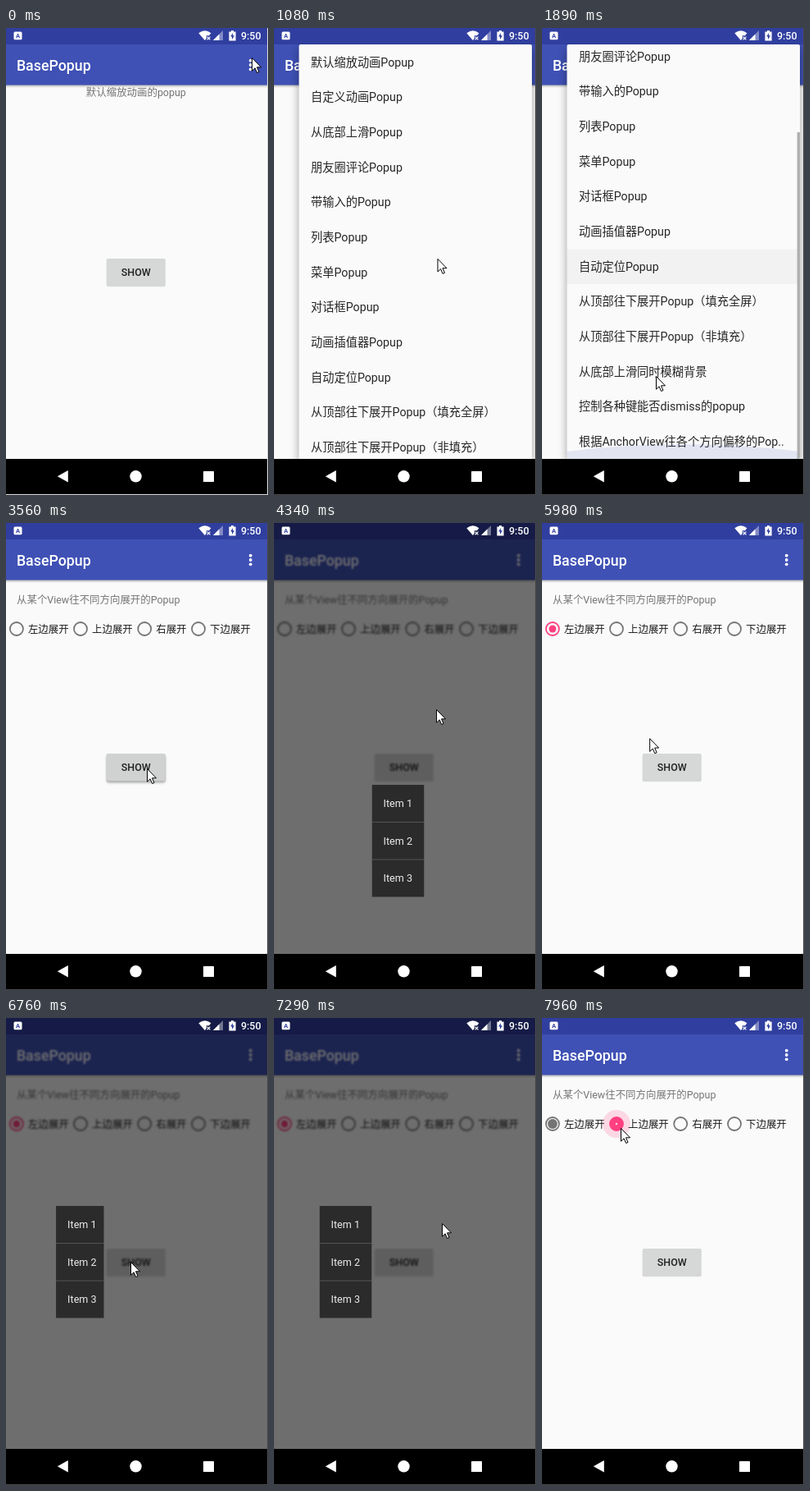
These frames come from a looping animation (320 px wide and 569 px high, 7.99 s). An HTML page:

```html
<!DOCTYPE html>
<html lang="zh-CN">
<head>
<meta charset="utf-8">
<title>BasePopup</title>
<style>
html, body { margin: 0; width: 100%; height: 100%; overflow: hidden; background: #000; }
svg { display: block; width: 100vw; height: 100vh; font-family: Roboto, "Noto Sans CJK SC", "Noto Sans CJK", "Noto Sans", sans-serif; }
text { white-space: pre; }
.body { font-size: 12.44px; }
.row { font-size: 14.22px; fill: #262626; }
.item { font-size: 12.6px; fill: #ececec; }
.medium { font-weight: 500; }
</style>
</head>
<body>
<svg viewBox="0 0 320 569" preserveAspectRatio="none">
  <defs>
    <clipPath id="screen"><rect y="19" width="319" height="506"/></clipPath>
    <clipPath id="list"><rect x="30.5" y="20" width="284.5" height="505" rx="2"/></clipPath>
    <clipPath id="reveal"><rect id="revealBox"/></clipPath>
    <clipPath id="below"><rect x="119.5" y="319" width="64" height="137"/></clipPath>
    <clipPath id="left"><rect x="55.5" y="229" width="64" height="137"/></clipPath>
    <linearGradient id="fall" x2="0" y2="1">
      <stop offset="0" stop-color="#000" stop-opacity=".3"/>
      <stop offset="1" stop-color="#000" stop-opacity="0"/>
    </linearGradient>
    <filter id="soft" x="-20%" y="-20%" width="140%" height="150%"><feGaussianBlur stdDeviation="1.6"/></filter>
    <filter id="wide" x="-10%" y="-10%" width="120%" height="120%"><feGaussianBlur stdDeviation="6"/></filter>
  </defs>

  <rect width="320" height="569" fill="#fafafa"/>
  <rect y="69" width="320" height="4" fill="url(#fall)"/>
  <rect width="320" height="20" fill="#303f9f"/>
  <rect y="20" width="320" height="49.5" fill="#3f51b5"/>

  <g id="content">
    <text class="medium" x="12.9" y="52" font-size="17.78" fill="#fff">BasePopup</text>
    <g fill="#fff">
      <circle cx="298.7" cy="39.7" r="1.9"/><circle cx="298.7" cy="45" r="1.9"/><circle cx="298.7" cy="50.3" r="1.9"/>
    </g>
    <text id="first" class="body" x="158.8" y="83" text-anchor="middle" fill="#757575">默认缩放动画的popup</text>
    <g id="second">
      <text class="body" x="13" y="97.5" fill="#757575">从某个View往不同方向展开的Popup</text>
      <g id="radios"></g>
    </g>
    <rect id="lift" x="123" y="283" width="71.5" height="33.5" rx="2" fill="#000" filter="url(#soft)"/>
    <rect x="122.6" y="281.2" width="72.2" height="34" rx="2" fill="#000" opacity=".12"/>
    <rect id="button" x="123" y="281" width="71.5" height="33.4" rx="1.8"/>
    <text class="medium body" x="158.8" y="302.4" text-anchor="middle" fill="#1f1f1f">SHOW</text>
  </g>

  <rect id="dim" width="319" height="525" fill="#000"/>
  <g clip-path="url(#below)"><g id="popBelow"></g></g>
  <g clip-path="url(#left)"><g id="popLeft"></g></g>

  <g clip-path="url(#screen)">
    <g id="menu" clip-path="url(#reveal)">
      <rect x="30.5" y="25" width="284.5" height="505" fill="#000" opacity=".36" filter="url(#wide)"/>
      <rect x="30.5" y="20" width="284.5" height="510" rx="2" fill="#fafafa"/>
      <g clip-path="url(#list)">
        <g id="rows">
          <rect id="hover" x="30" width="286" height="42.67"/>
          <rect id="press" x="30" width="286" height="42.67"/>
        </g>
        <path id="glow" d="M30 516Q172 498 315 516V525H30Z" fill="#3f51b5"/>
        <rect id="thumb" x="311.6" width="3.4" height="398" fill="#b0b0b0"/>
      </g>
    </g>
  </g>

  <g fill="#fff">
    <rect x="9.5" y="4.5" width="10" height="9.8" rx="1.5"/>
    <text x="14.5" y="12.2" font-size="7.5" font-weight="700" text-anchor="middle" fill="#303f9f">A</text>
    <path d="M235.3 6.2Q243 .2 250.4 6.2L248 9.2H244.7V13L242.8 15Z"/>
    <path d="M245.6 10.6l3.8 3.8m0-3.8l-3.8 3.8" stroke="#fff" stroke-width="1.2"/>
    <path d="M253 15L265 3V15Z" opacity=".4"/>
    <path d="M253 15L260.5 7.5V15Z"/>
    <path d="M275 3h3v1.4h2.6V15.6h-8.2V4.4H275Z"/>
    <path d="M277 6L274.2 10.6H276V14L279 9.2H277Z" fill="#303f9f"/>
    <text class="medium body" x="287" y="14">9:50</text>
  </g>

  <rect y="525" width="320" height="44" fill="#000"/>
  <g fill="#fff">
    <path d="M62.8 546.3L75.8 539V553.6Z"/>
    <circle cx="158.5" cy="546.3" r="7.2"/>
    <rect x="241" y="540" width="13" height="13" rx=".6"/>
  </g>
  <path id="edge" d="M319 0H320V569H0V568H319Z"/>

  <path id="cursor" d="M.5.5V16.2L4.1 12.8 6.6 18.5 9 17.5 6.5 11.8H11.5Z" fill="#fff" stroke="#000" stroke-width="1"/>
</svg>
<script>
const LOOP = 7990, HOLD = 7960, ROW = 42.67, TOP = 20.4, SCROLL = 135;
const $ = id => document.getElementById(id);
const set = (el, attrs) => { for (const k in attrs) el.setAttribute(k, attrs[k]); return el; };
const add = (parent, tag, attrs, text = '') => {
  const el = set(document.createElementNS('http://www.w3.org/2000/svg', tag), attrs);
  el.textContent = text;
  return parent.appendChild(el);
};
const clamp = x => Math.min(1, Math.max(0, x));
const part = (t, from, to) => clamp((t - from) / (to - from));
const smooth = p => p * p * (3 - 2 * p);
const out = (p, n) => 1 - (1 - p) ** n;
// rises over a..b, falls over c..d
const pulse = (t, a, b, c, d) => part(t, a, b) * (1 - part(t, c, d));

const names = [
  '默认缩放动画Popup', '自定义动画Popup', '从底部上滑Popup', '朋友圈评论Popup', '带输入的Popup',
  '列表Popup', '菜单Popup', '对话框Popup', '动画插值器Popup', '自动定位Popup',
  '从顶部往下展开Popup（填充全屏）', '从顶部往下展开Popup（非填充）', '从底部上滑同时模糊背景',
  '控制各种键能否dismiss的popup', '根据AnchorView往各个方向偏移的Pop..'
];
names.forEach((name, i) => add($('rows'), 'text', { class: 'row', x: 45, y: TOP + ROW * (i + .5) + 5 }, name));
set($('hover'), { y: TOP + ROW * 9 });
set($('press'), { y: TOP + ROW * 14 });

const R = 8.9, THIN = 1.78, DOT = 4.44;
const radios = [[12.9, '左边展开'], [91, '上边展开'], [169.2, '右展开'], [235, '下边展开']].map(([cx, label]) => {
  const g = $('radios'), at = { cx, cy: 129 };
  const ripple = add(g, 'circle', { ...at, fill: '#ff4081' });
  const ring = add(g, 'circle', { ...at, fill: 'none' });
  const dot = add(g, 'circle', at);
  add(g, 'text', { class: 'body', x: cx + 14, y: 133.6, fill: '#1c1c1c' }, label);
  return { ripple, ring, dot };
});

// p = 0 is empty, 1 is checked; the disc is full halfway
function drawRadio({ ripple, ring, dot }, p, color, wave = 0, alpha = 0) {
  const w = p < .5 ? THIN + (R - THIN) * 2 * p : THIN;
  set(ring, { r: R - w / 2, 'stroke-width': w, stroke: color });
  set(dot, { r: p < .5 ? 0 : R - (R - DOT) * (2 * p - 1), fill: color });
  set(ripple, { r: 17 * wave, opacity: .18 * alpha });
}

function buildPopup(g, x, y) {
  add(g, 'rect', { x, y, width: 64, height: 136.5, fill: '#2b2b2b' });
  for (let i = 0; i < 3; i++) {
    if (i) add(g, 'rect', { x, y: y + 45.5 * i - .4, width: 64, height: .9, fill: '#5a5a5a' });
    add(g, 'text', { class: 'item', x: x + 14, y: y + 45.5 * i + 27.3 }, 'Item ' + (i + 1));
  }
}
buildPopup($('popBelow'), 119.5, 319);
buildPopup($('popLeft'), 55.5, 229);

// time, x, y, eased on arrival
const path = [
  [0, 300, 36], [120, 300, 36], [280, 300, 43], [760, 300, 43], [1310, 139, 424, 1], [1950, 139, 424],
  [2250, 108, 500, 1], [2700, 108, 500], [3170, 182, 329, 1], [3200, 182, 329], [3330, 172, 299],
  [4140, 172, 299], [4340, 198, 227], [4400, 200, 224], [4560, 200, 224], [4930, 0, 118, 1],
  [5140, 0, 118], [5170, 4, 118], [5680, 4, 118], [5980, 131, 262], [6090, 149, 286], [6120, 149, 286],
  [6280, 152, 297], [7140, 152, 297], [7290, 205, 250], [7440, 205, 250], [7910, 96, 134, 1], [LOOP, 96, 134]
];
function cursorAt(t) {
  const i = path.findIndex(k => k[0] > t), a = path[i - 1], b = path[i];
  let p = part(t, a[0], b[0]);
  if (b[3]) p = smooth(p);
  return [a[1] + (b[1] - a[1]) * p, a[2] + (b[2] - a[2]) * p];
}

function draw(now) {
  const t = Math.min(now, HOLD);

  // overflow menu
  const open = out(part(t, 660, 900), 2), w = 40 + 280 * open, h = 40 + 490 * open;
  set($('menu'), { opacity: pulse(t, 660, 780, 2600, 2760), display: t > 660 && t < 2760 ? 'inline' : 'none' });
  set($('revealBox'), { x: 320 - w, y: 18, width: w, height: h });
  const scroll = SCROLL * smooth(part(t, 1450, 1820));
  set($('rows'), { transform: `translate(0 ${-scroll})` });
  set($('thumb'), { y: 20 + scroll * 107 / SCROLL, opacity: pulse(t, 1450, 1500, 2080, 2250) });
  set($('glow'), { opacity: .13 * pulse(t, 1780, 1880, 1920, 2180) });
  set($('hover'), { opacity: .03 * pulse(t, 1450, 1490, 1920, 2060) });
  set($('press'), { opacity: .1 * pulse(t, 2390, 2500, 2600, 2760) });

  // pages
  const next = t >= 2620;
  set($('first'), { display: next ? 'none' : 'inline' });
  set($('second'), { display: next ? 'inline' : 'none' });
  const down = Math.max(pulse(t, 3530, 3560, 3760, 3940), pulse(t, 6250, 6280, 6450, 6640));
  set($('lift'), { opacity: .3 * down });
  set($('button'), { fill: down > .5 ? '#d0d1d1' : '#d6d7d7' });

  // popups
  const dim = Math.max(pulse(t, 3740, 3940, 4480, 4760), pulse(t, 6430, 6640, 7320, 7600));
  set($('dim'), { opacity: .56 * dim });
  $('content').style.filter = dim > 0 ? `blur(${.85 * dim}px)` : 'none';
  const below = out(part(t, 3740, 3940), 1.8) - part(t, 4480, 4760) ** 1.8;
  const left = out(part(t, 6440, 6870), 1.8) - part(t, 7320, 7600) ** 1.8;
  set($('popBelow'), { transform: `translate(0 ${-140 * (1 - below)})` });
  set($('popLeft'), { transform: `translate(${66 * (1 - left)} 0)` });

  // radio buttons
  const pick = part(t, 5320, 5570), off = part(t, 7920, 8160), on = part(t, 7919, 8019);
  drawRadio(radios[0], t < 7920 ? pick : 1 - off, pick > 0 && t < 7920 ? '#ff4081' : '#757575',
    out(part(t, 5310, 5420), 2), pulse(t, 5310, 5340, 5440, 5680));
  drawRadio(radios[1], on, on > 0 ? '#ff4081' : '#757575', out(part(t, 7915, 7960), 2), part(t, 7915, 7935));
  drawRadio(radios[2], 0, '#757575');
  drawRadio(radios[3], 0, '#757575');

  set($('edge'), { fill: t < 460 ? '#dcdcdc' : '#4a4a4a' });
  const [x, y] = cursorAt(t);
  set($('cursor'), { transform: `translate(${x} ${y})` });
}

const start = performance.now();
function tick() {
  draw((performance.now() - start) % LOOP);
  requestAnimationFrame(tick);
}
tick();
</script>
</body>
</html>
```
